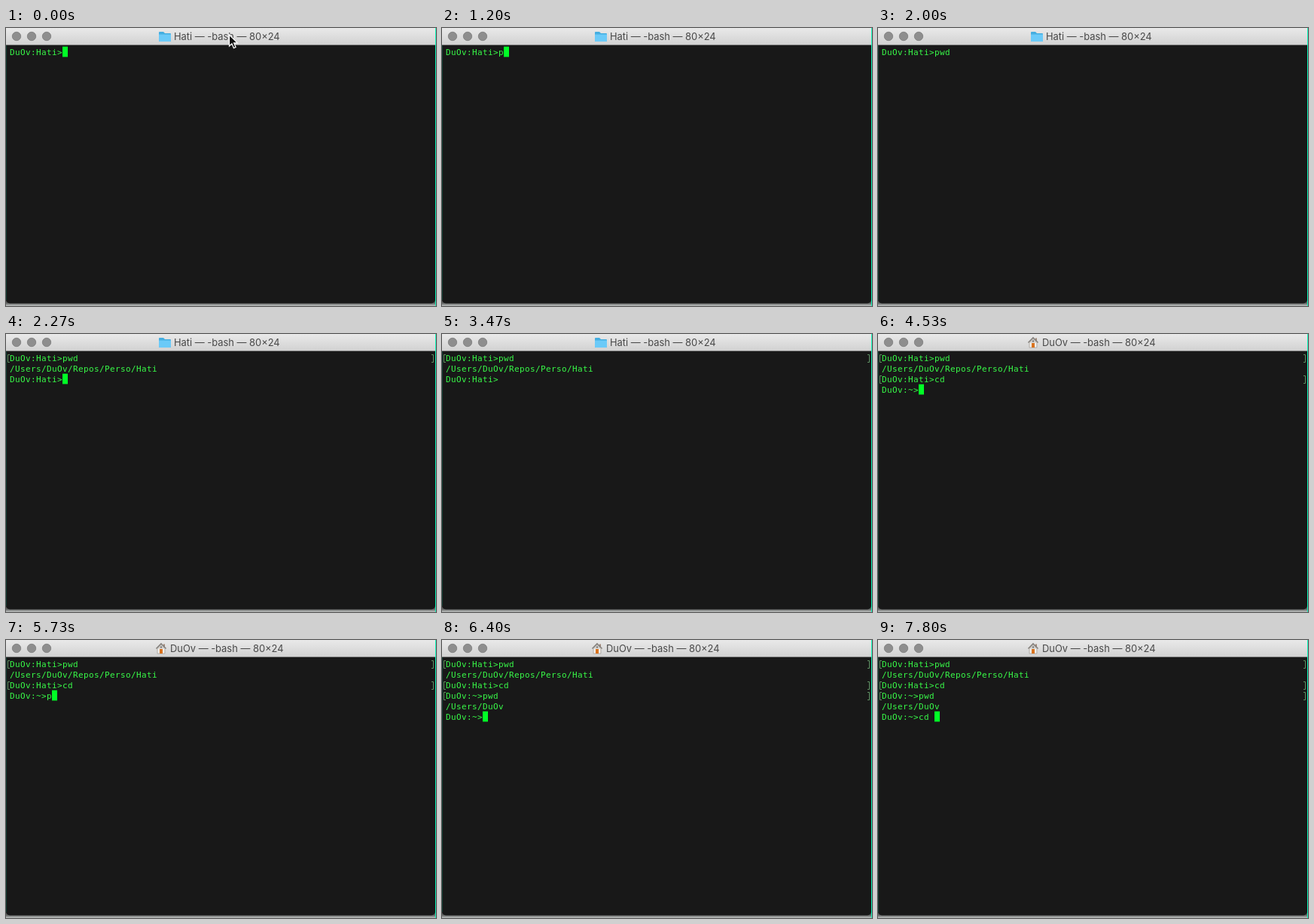
An HTML page with a canvas that plays this animation: 571 px wide and 369 px high, repeating every 8000 ms.

```html
<!DOCTYPE html>
<html lang="en">
<head>
<meta charset="utf-8">
<title>Terminal session</title>
<style>
  html, body { margin: 0; width: 100%; height: 100%; overflow: hidden; background: #191919; }
  canvas { display: block; }
</style>
</head>
<body>
<canvas id="stage" width="571" height="369"></canvas>
<script>
const ctx = document.getElementById('stage').getContext('2d');
const LOOP = 8000, CELL_W = 7, CELL_H = 14;
const USER = 'DuOv';

// Commands already run, and the directory each prompt shows.
const history = [
  { command: 'pwd', output: `/Users/${USER}/Repos/Perso/Hati` },
  { command: 'cd' },
  { command: 'pwd', output: `/Users/${USER}` }
];
const dirs = ['Hati', 'Hati', '~', '~'];

// [start ms, commands run, text being typed, block cursor visible]
const steps = [
  [0, 0, '', true], [470, 0, '', false], [1000, 0, '', true],
  [1200, 0, 'p', true], [1270, 0, 'pw', true], [1400, 0, 'pwd', true], [2000, 0, 'pwd', false],
  [2270, 1, '', true], [2330, 1, '', false], [3000, 1, '', true], [3470, 1, '', false],
  [3870, 1, 'c', true], [4000, 1, 'cd', true],
  [4530, 2, '', true], [4600, 2, '', false], [5000, 2, '', true], [5470, 2, '', false],
  [5730, 2, 'p', true], [5870, 2, 'pw', true], [6000, 2, 'pwd', true],
  [6400, 3, '', true], [7000, 3, '', false], [7470, 3, '', true],
  [7600, 3, 'c', true], [7730, 3, 'cd', true], [7800, 3, 'cd ', true]
];

function rect(x, y, w, h, color) {
  ctx.fillStyle = color;
  ctx.fillRect(x, y, w, h);
}

function shape(path, fill, stroke, width = 1) {
  const p = new Path2D(path);
  ctx.fillStyle = fill;
  ctx.fill(p);
  if (stroke) {
    ctx.strokeStyle = stroke;
    ctx.lineWidth = width;
    ctx.stroke(p);
  }
}

function vertical(y0, y1, from, to) {
  const g = ctx.createLinearGradient(0, y0, 0, y1);
  g.addColorStop(0, from);
  g.addColorStop(1, to);
  return g;
}

function drawFolder() {
  shape('M203 6q0-1 1-1h5l2 2h7q1 0 1 1v9q0 1-1 1h-14q-1 0-1-1z', '#45aee0');
  shape('M203 8.5h16v8.5q0 1-1 1h-14q-1 0-1-1z', '#6bcaf8');
}

function drawHouse() {
  rect(209, 5.5, 2, 4, '#a08878');
  shape('M201 11l5-5 5 5v7h-10z', '#f0eeea', '#b0adaa');
  shape('M199.5 11.5l6.5-6.5 6.5 6.5', '#cfcdca', '#85817d', 1.6);
  rect(205, 8.5, 2, 2, '#777');
  rect(204, 12, 4, 6, '#d9731f');
}

function drawWindow(atHome) {
  rect(0, 0, 571, 369, vertical(365, 369, '#5c5e5d', '#c0c3c2'));
  rect(570, 0, 1, 369, '#0cf5b8');
  ctx.fillStyle = '#181818';
  ctx.beginPath();
  ctx.roundRect(0, 0, 570, 365.5, [0, 0, 5, 5]);
  ctx.fill();
  rect(0, 23, 1, 338, '#0f3a30');
  rect(0, 0, 570, 22, vertical(0, 22, '#e9e9e9', '#d2d2d2'));
  rect(0, 22, 570, 1, '#7d7d7d');
  for (const x of [14, 34, 54]) {
    ctx.beginPath();
    ctx.arc(x, 11, 5.7, 0, 7);
    ctx.fillStyle = '#8e8e8e';
    ctx.fill();
    ctx.strokeStyle = '#7c7c7c';
    ctx.lineWidth = 0.8;
    ctx.stroke();
  }
  if (atHome) drawHouse(); else drawFolder();
  ctx.font = '12.9px Inter, sans-serif';
  ctx.letterSpacing = '0px';
  ctx.fillStyle = '#484848';
  ctx.fillText(`${atHome ? USER : 'Hati'} — -bash — 80×24`, atHome ? 218 : 223, 16);
}

function drawBrackets(y) {
  ctx.strokeStyle = '#5f8f62';
  ctx.lineWidth = 1;
  ctx.stroke(new Path2D(`M5 ${y + 2.5}h-2.5v10h2.5M565 ${y + 2.5}h2.5v10h-2.5`));
}

function drawSession(done, typed, cursor) {
  let y = 25;
  const print = text => {
    ctx.fillStyle = '#38fa48';
    ctx.fillText(text, 5, y + 11);
    y += CELL_H;
  };
  const prompt = i => `${USER}:${dirs[i]}>`;
  ctx.font = '11px "DejaVu Sans Mono", monospace';
  ctx.letterSpacing = `${CELL_W - ctx.measureText('0').width}px`;
  history.slice(0, done).forEach(({ command, output }, i) => {
    drawBrackets(y);
    print(prompt(i) + command);
    if (output) print(output);
  });
  const line = prompt(done) + typed;
  if (cursor) rect(5 + line.length * CELL_W, y - 0.3, CELL_W, CELL_H - 0.3, '#00ff26');
  print(line);
}

// The pointer leaves through the lower right corner at 15 steps a second.
function drawPointer(t) {
  const tick = Math.floor(t * 0.015 + 0.01) / 0.015;
  const p = Math.max(0, (tick - 1000) / 200);
  if (p > 0.99) return;
  ctx.save();
  ctx.translate(296.5 + 274 * p, 9 + 360 * p);
  shape('M0 0v15l3.4-3.2 2.5 5.8 2.7-1.1-2.5-5.7h4.7z', '#111', '#fff', 1.2);
  ctx.restore();
}

function frame(now) {
  const t = now % LOOP;
  const [, done, typed, cursor] = steps.findLast(step => step[0] <= t);
  drawWindow(done > 1);
  drawSession(done, typed, cursor);
  drawPointer(t);
  requestAnimationFrame(() => frame(performance.now()));
}
frame(performance.now());
</script>
</body>
</html>
```
